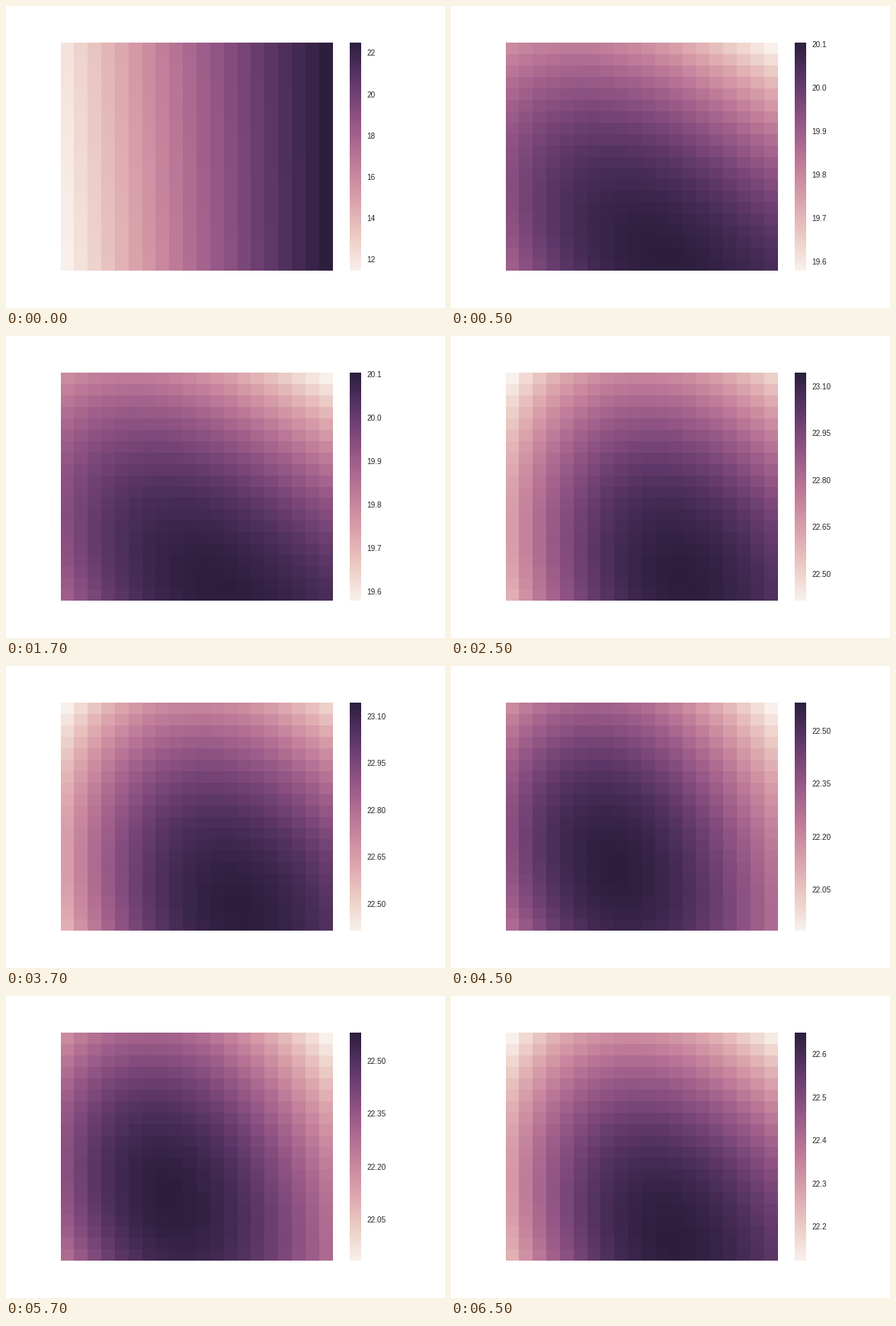
A matplotlib script for the animation above (8 s loop, 576x396 px).

```python
import matplotlib.pyplot as plt
import numpy as np
from matplotlib.animation import FuncAnimation
from matplotlib.colors import ListedColormap
from matplotlib.transforms import Affine2D

plt.rcParams["font.family"] = "Liberation Sans"
X, Y = np.meshgrid(np.linspace(0, 1, 20), np.linspace(0, 1, 20))


def ramp():
    """Rising from left to right, slightly cooler at the lower left."""
    return 1.1 * X - .08 * X**2 - .09 * X**3 - .06 * Y * (1 - X)


def hill(px, py, fall, skew, slant, drop, taper):
    """Hill with its top at (px, py) and a slanted crest."""
    dx = X - px
    dy = Y - py - slant * dx
    return -(fall - skew * dx) * dx**2 - (drop - taper * dx) * dy**2


# Surface, lowest and highest value, tick step, decimals
SCENES = [
    (ramp(), 11.52, 22.55, 2, 0),
    (hill(.6, 1, .58, .43, .6, .66, .12), 19.5807, 20.106, .1, 1),
    (hill(.66, .93, 1.2, .49, .38, .68, .05), 22.418, 23.147, .15, 2),
    (hill(.4, .74, 1.615, .65, .4, .73, .28), 21.9364, 22.583, .15, 2),
    (hill(.62, .92, 1.32, .64, .43, .75, .12), 22.1239, 22.653, .1, 1),
]


def cubehelix(light=.95, dark=.15, rot=.4, hue=.8):
    x = np.linspace(light, dark, 256)
    amp = hue * x * (1 - x) / 2
    phi = 2 * np.pi * rot * x
    weights = [(-.14861, 1.78277), (-.29227, -.90649), (1.97294, 0)]
    rgb = [x + amp * (p * np.cos(phi) + q * np.sin(phi)) for p, q in weights]
    return ListedColormap(np.clip(np.transpose(rgb), 0, 1))


def normalise(z):
    return (z - z.min()) / (z.max() - z.min())


def mesh_axes(left, width, values):
    ax = fig.add_axes([left, .125, width, .755])
    ax.spines[:].set_visible(False)
    ax.set_xticks([])
    ax.set_yticks([])
    mesh = ax.pcolormesh(values, cmap=cmap, vmin=0, vmax=1)
    # Cell edges round down to whole pixels
    mesh.set_transform(ax.transData + Affine2D().translate(-.495, -.495))
    mesh.set_clip_on(False)
    return ax, mesh


fig = plt.figure(figsize=(8, 5.5), dpi=72, facecolor="white")
cmap = cubehelix()

ax, heat = mesh_axes(.125, .62, normalise(SCENES[0][0]))
ax.invert_yaxis()

bar, _ = mesh_axes(.78375, .02595, np.linspace(0, 1, 256)[:, None])
bar.yaxis.tick_right()
bar.tick_params(axis="y", length=0, pad=7, labelsize=10, labelcolor=".15")


def draw(step):
    surface, low, high, gap, decimals = SCENES[(step + 3) // 4]
    heat.set_array(normalise(surface))
    ticks = gap * np.arange(np.ceil(low / gap), np.floor(high / gap) + 1)
    bar.set_yticks(256 * (ticks - low) / (high - low),
                   [f"{t:.{decimals}f}" for t in ticks], va="center")
    bar.set_ylim(0, 256)
    return []


anim = FuncAnimation(fig, draw, frames=16, interval=500, repeat=True)
plt.show()
```
